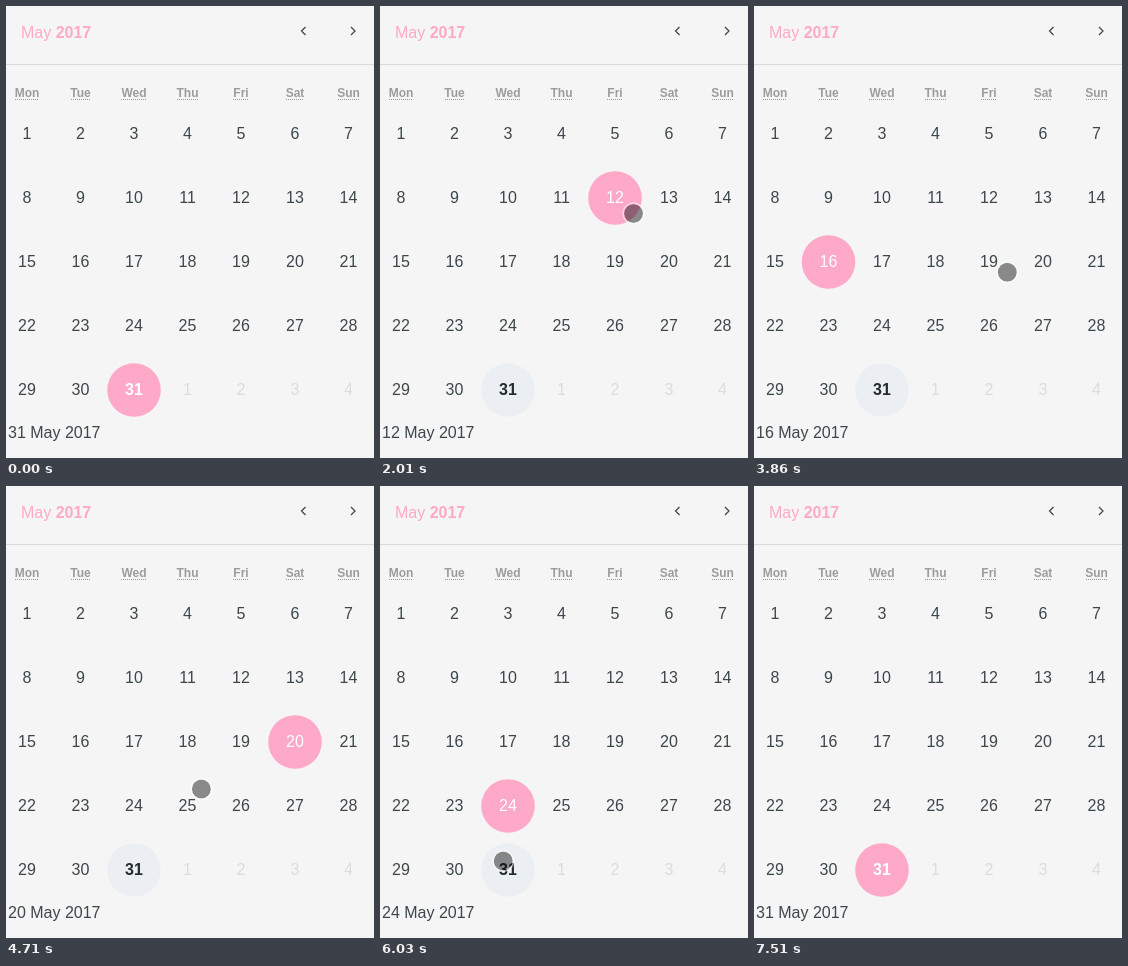
These frames come from a looping animation (368 by 452 pixels, 8.67 s). An HTML page:

```html
<!DOCTYPE html>
<html lang="en">
<head>
<meta charset="utf-8">
<title>Calendar</title>
<style>
  html, body { margin: 0; width: 100%; height: 100%; overflow: hidden; background: #f5f5f5; }
  svg { display: block; font: 16px "Liberation Sans", Arial, sans-serif; fill: #3c464b; }
  .center { text-anchor: middle; }
  .month { fill: #ffa9c9; }
  .bold { font-weight: bold; fill: #242b2f; }
  .month .bold { fill: inherit; }
  .weekday { font-size: 12px; font-weight: bold; fill: #9c9c9c; }
  .dots { stroke: #999; stroke-dasharray: 1 1; }
  .muted { fill: #dcdcdc; }
  .today { fill: #ebeff3; }
  .selected { fill: #ffa9c9; }
  .picked { fill: #fff; }
  .arrow { fill: none; stroke: #444; stroke-width: 1.25; }
</style>
</head>
<body>
<svg id="stage" width="368" height="452" viewBox="0 0 368 452">
  <text class="month" x="15" y="32">May <tspan class="bold">2017</tspan></text>
  <path class="arrow" d="M299.5 21l-4 4 4 4M345 21l4 4-4 4"/>
  <rect y="58" width="368" height="1" fill="#d9d9d9"/>
</svg>
<script>
const LOOP = 8670;
const STEP = 77;
const TODAY = 31;
const DAYS_IN_MONTH = 31;
const stage = document.getElementById("stage");

const CLICKS = [
  { at: 0, day: 31 }, { at: 2010, day: 12 }, { at: 3320, day: 16 },
  { at: 4550, day: 20 }, { at: 5630, day: 24 }, { at: 6560, day: 31 }
];

// Each move leaves from where the previous one ended; "bend" holds the Bezier handles.
const ENTRY = [260, 452];
const MOVES = [
  { start: 930, end: 1230, to: [260, 224] },
  { start: 1710, end: 1780, to: [253.5, 207.5] },
  { start: 2410, end: 3250, bend: [[250, 290], [-26, 277]], to: [62, 276] },
  { start: 3630, end: 3940, bend: [[110, 320], [215, 272]], to: [273, 262] },
  { start: 4090, end: 4250, to: [287, 254] },
  { start: 4550, end: 5400, bend: [[230, 290], [15, 394]], to: [112.5, 313.5] },
  { start: 5870, end: 6180, bend: [[114, 345], [128, 375]], to: [122.5, 391.5] },
  { start: 7270, end: 7430, to: [154, 440] }
];
const EXIT = 7510;

function add(name, attrs, text = "") {
  const node = document.createElementNS(stage.namespaceURI, name);
  for (const key in attrs) node.setAttribute(key, attrs[key]);
  node.textContent = text;
  stage.append(node);
  return node;
}

// Columns snap to half pixels.
function cell(index) {
  return {
    x: Math.floor(2 * (21 + 53.6 * (index % 7))) / 2,
    y: 128 + 64 * Math.floor(index / 7)
  };
}

function addDisc(className, day) {
  const { x, y } = cell(day - 1);
  return add("circle", { class: className, cx: x, cy: y, r: 26.8 });
}

["Mon", "Tue", "Wed", "Thu", "Fri", "Sat", "Sun"].forEach((name, i) => {
  const { x } = cell(i);
  const label = add("text", { class: "weekday center", x, y: 91 }, name);
  const half = Math.round(label.getComputedTextLength() / 2);
  add("path", { class: "dots", d: `M${Math.round(x) - half} 93.5h${2 * half}` });
});

const todayDisc = addDisc("today", TODAY);
const disc = addDisc("selected", TODAY);

const days = Array.from({ length: 35 }, (_, i) => {
  const { x, y } = cell(i);
  const kind = i >= DAYS_IN_MONTH ? " muted" : i + 1 === TODAY ? " bold" : "";
  return add("text", { class: "center" + kind, x, y: y + 5 }, i % DAYS_IN_MONTH + 1);
});
const caption = add("text", { x: 2, y: 432 });

const pointer = add("g", {});
pointer.append(
  add("circle", { r: 9.5, fill: "#000", "fill-opacity": 0.44 }),
  add("circle", { r: 10.25, fill: "none", stroke: "#fff", "stroke-opacity": 0.55, "stroke-width": 1.5 })
);

const easeOut = p => 1 - (1 - p) ** 1.4;

function bezier(a, b, c, d, u) {
  const v = 1 - u;
  return a.map((_, i) => v ** 3 * a[i] + 3 * v * v * u * b[i] + 3 * v * u * u * c[i] + u ** 3 * d[i]);
}

function pointerAt(time) {
  const index = MOVES.findLastIndex(move => move.start <= time);
  if (index < 0 || time >= EXIT) return null;
  const { start, end, to, bend } = MOVES[index];
  const from = index ? MOVES[index - 1].to : ENTRY;
  const steps = Math.round((end - start) / STEP) + 1;
  const step = Math.floor((time - start) / STEP + 0.05) + 1;
  const u = easeOut(Math.min(1, step / steps));
  if (bend) return bezier(from, ...bend, to, u);
  return from.map((value, i) => value + (to[i] - value) * u);
}

let shownDay = 0;
function select(day) {
  if (day === shownDay) return;
  shownDay = day;
  const { x, y } = cell(day - 1);
  disc.setAttribute("cx", x);
  disc.setAttribute("cy", y);
  todayDisc.style.display = day === TODAY ? "none" : "";
  days.forEach((node, i) => { node.style.fill = i === day - 1 ? "#fff" : ""; });
  caption.textContent = `${day} May 2017`;
}

const begin = performance.now();
function draw() {
  const time = (performance.now() - begin) % LOOP;
  select(CLICKS.findLast(click => click.at <= time).day);
  const spot = pointerAt(time);
  pointer.style.display = spot ? "" : "none";
  if (spot) pointer.setAttribute("transform", `translate(${spot})`);
  requestAnimationFrame(draw);
}
draw();
</script>
</body>
</html>
```
